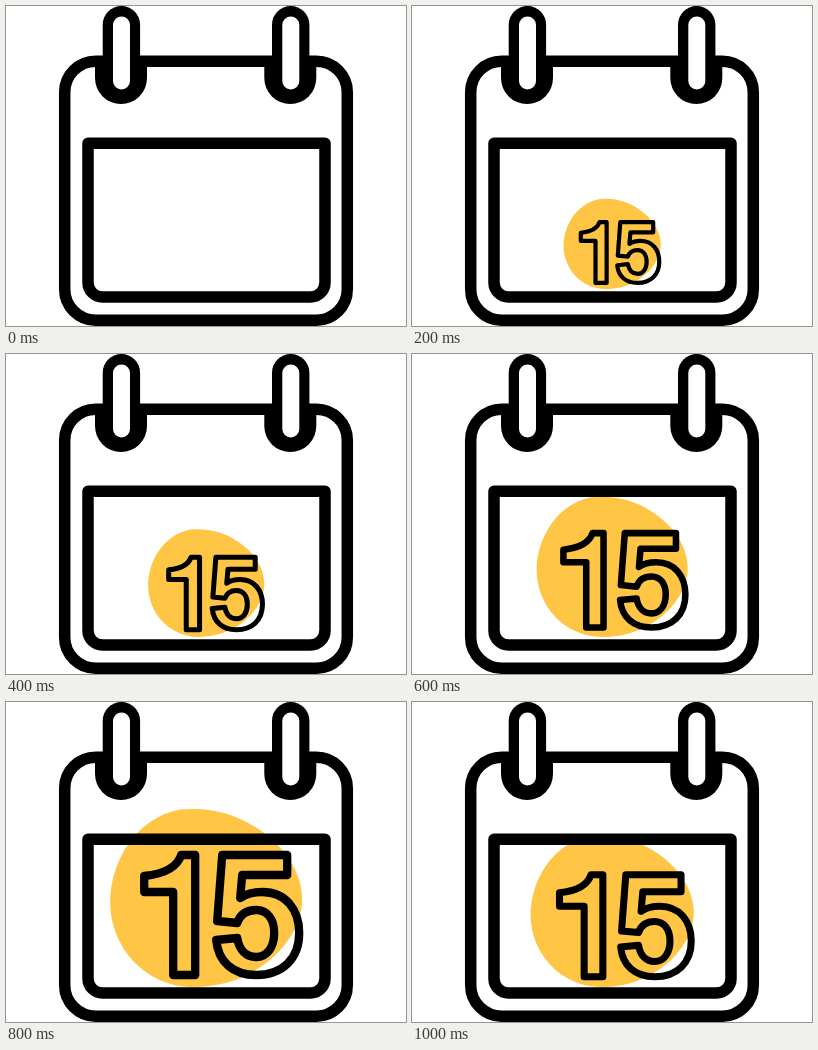
An HTML page for the animation above (1.2 s loop, 400 by 320 pixels).

```html
<!DOCTYPE html>
<html lang="en">
<head>
<meta charset="utf-8">
<title>Calendar</title>
<style>
  html, body { margin: 0; width: 100%; height: 100%; overflow: hidden; background: #fff; }
  svg { display: block; width: 100%; height: 100%; }
  .line { fill: none; stroke: #000; stroke-linejoin: round; }
</style>
</head>
<body>
<svg viewBox="0 0 400 320">
  <defs>
    <g id="ring">
      <path d="M89 55H141V72a26 26 0 0 1-52 0Z"/>
      <rect x="96.7" width="37.4" height="92" rx="18.7"/>
      <rect x="107" y="10.5" width="17" height="73" rx="8.5" fill="#fff"/>
    </g>
  </defs>

  <!-- drawn around its bottom centre, behind the calendar -->
  <g id="date" transform="scale(0)">
    <g transform="translate(-200 -285)">
      <path fill="#ffc545" d="M174 107.5C200 105 226 110 249 125C277 142 296 170 296 197C296 225 276 253 248 269C230 280 208 285 187 285C140 285 104 246 104 200C104 162 128 116 174 107.5Z"/>
      <g class="line" stroke-width="8.3">
        <path d="M189 153H175C171 165 158 172 138 174V190H167V273H189Z"/>
        <path d="M216 153H281V173H236L234 196C241 191 249 190 256 190C279 190 293 207 293 231C293 257 276 273 250 273C227 273 212 260 210 238L231 236C233 248 240 255 250 255C261 255 268 245 268 231C268 217 261 208 250 208C241 208 234 212 231 221L211 219Z"/>
      </g>
    </g>
  </g>

  <g class="line" stroke-width="11.5">
    <rect x="58.7" y="55.2" width="282.6" height="259" rx="31"/>
    <path d="M82 137.3H319V276.5a14.5 14.5 0 0 1-14.5 14.5H96.5a14.5 14.5 0 0 1-14.5-14.5Z"/>
  </g>
  <use href="#ring"/>
  <use href="#ring" x="169.3"/>
</svg>
<script>
  const hold = 200;
  const scales = [0, 0.506, 0.605, 0.787, 1, 0.85]; // pop up, then settle
  const date = document.getElementById('date');

  function draw() {
    const step = Math.floor(performance.now() / hold) % scales.length;
    const scale = scales[step];
    const base = scale > 0.8 ? 285 : 283;
    date.setAttribute('transform', `translate(200.2 ${base}) scale(${scale})`);
    requestAnimationFrame(draw);
  }
  draw();
</script>
</body>
</html>
```
